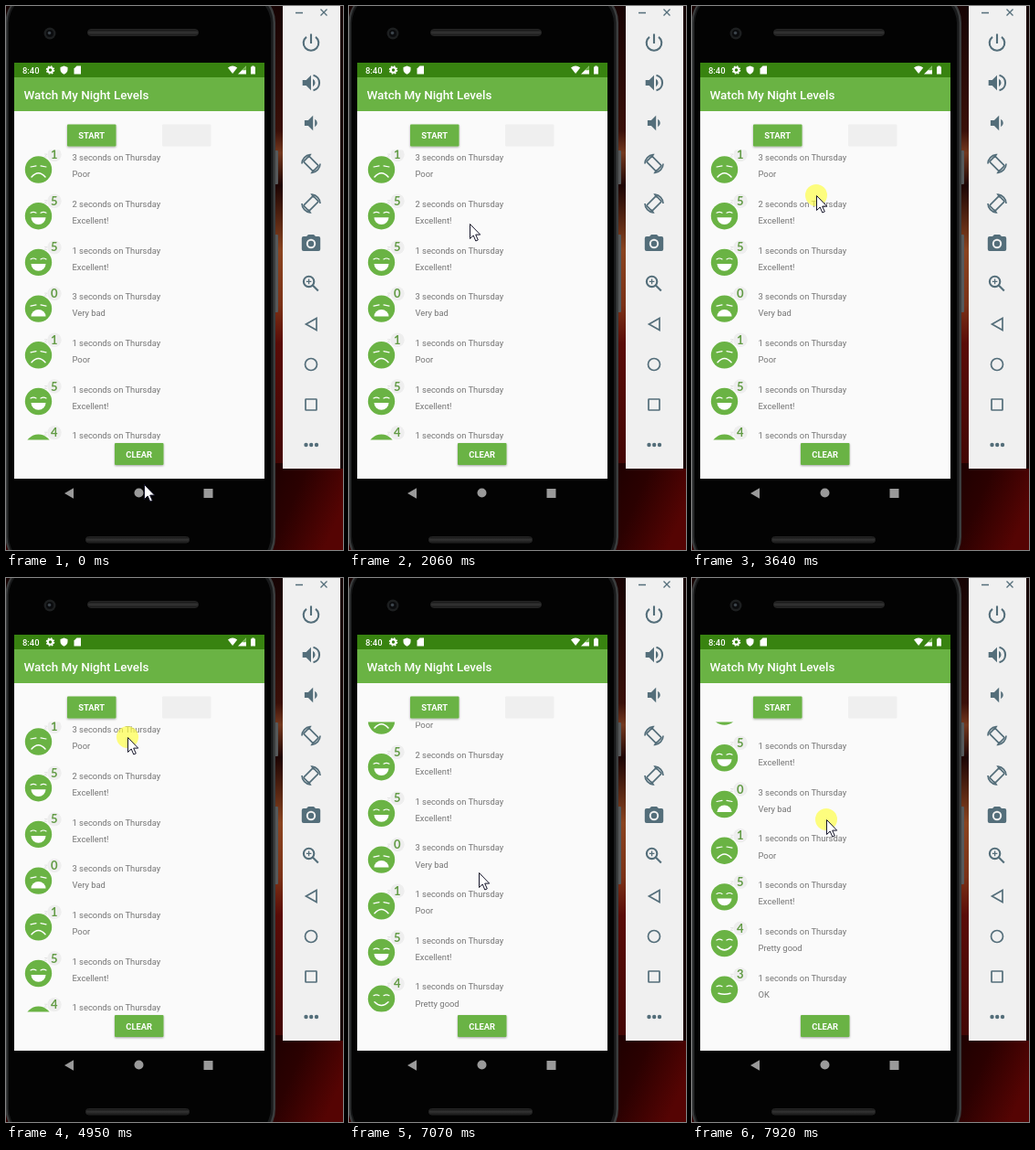
An HTML page for the animation above (8000 ms loop, 369 by 595 pixels).

```html
<!DOCTYPE html>
<html lang="en">
<head>
<meta charset="utf-8">
<title>Sleep list</title>
<style>
html, body { margin: 0; width: 100%; height: 100%; overflow: hidden; background: #000; }
svg { display: block; width: 100%; height: 100%; }
text { font-family: Roboto, "Noto Sans", sans-serif; font-size: 9.4px; }
.bold { font-weight: 500; fill: #fff; }
.title { font-size: 13.4px; }
.btn { font-weight: 700; fill: #fff; text-anchor: middle; }
.row { fill: #757575; }
.badge { font: 700 13px Lato, "Open Sans", sans-serif; fill: #629b45; text-anchor: middle; }
.line { fill: none; stroke: #fff; stroke-width: 1.5; stroke-linecap: round; }
.eyes { stroke-width: 1.2; }
.tool { fill: #546e7a; }
.open { fill: none; stroke: #546e7a; stroke-width: 1.7; }
.thin { stroke-width: 1.3; }
.thick { stroke-width: 2.1; }
</style>
</head>
<body>
<svg viewBox="0 0 369 595">
  <defs>
    <linearGradient id="wall" x2="0" y2="1">
      <stop offset="0" stop-color="#160303"/><stop offset=".23" stop-color="#3a1009"/>
      <stop offset=".27" stop-color="#74391f"/><stop offset=".33" stop-color="#1d0504"/>
      <stop offset=".45" stop-color="#8a4420"/><stop offset=".55" stop-color="#7b3217"/>
      <stop offset=".62" stop-color="#5a0c08"/><stop offset="1" stop-color="#330202"/>
    </linearGradient>
    <linearGradient id="floor" x2="1" y2=".5">
      <stop offset="0" stop-color="#1c0101"/><stop offset=".45" stop-color="#2b0101"/>
      <stop offset="1" stop-color="#550403"/>
    </linearGradient>
    <linearGradient id="bar" x2="0" y2="1">
      <stop offset="0" stop-color="#111"/><stop offset=".5" stop-color="#343434"/><stop offset="1" stop-color="#171717"/>
    </linearGradient>
    <filter id="shadow" x="-20%" y="-20%" width="140%" height="160%">
      <feDropShadow dx="0" dy="1" stdDeviation=".9" flood-opacity=".35"/>
    </filter>
    <clipPath id="view"><rect x="9" y="157.5" width="274" height="317"/></clipPath>
  </defs>

  <rect width="369" height="595" fill="url(#wall)"/>
  <rect x="285" y="500" width="84" height="95" fill="url(#floor)"/>
  <rect x="366" width="3" height="506" fill="#160202"/>

  <!-- phone -->
  <rect x="293" y="158" width="5" height="37" rx="1" fill="#55585a"/>
  <rect x="293" y="250" width="5" height="85" rx="1" fill="#55585a"/>
  <rect x="-.5" y="-17" width="295.5" height="633" rx="35" fill="#3b3d3e"/>
  <rect x="1.5" y="-15" width="291" height="629" rx="33" fill="#191a1b"/>
  <rect x="3" y="-13" width="287" height="625" rx="32" fill="#030303"/>
  <circle cx="48" cy="30" r="6.5" fill="#1d1f20"/>
  <circle cx="48" cy="30" r="4" fill="#0b0c0e"/>
  <circle cx="47.5" cy="29.5" r="1.8" fill="#3c444b"/>
  <rect x="89.5" y="25.5" width="121" height="7" rx="3.5" fill="url(#bar)" stroke="#242424"/>
  <rect x="87.5" y="580.5" width="113" height="6.5" rx="3" fill="url(#bar)" stroke="#242424"/>

  <!-- screen -->
  <rect x="9" y="62" width="274" height="455" fill="#fafafa"/>
  <rect x="9" y="78" width="274" height="37" fill="#6ab344"/>
  <rect x="9" y="62" width="274" height="16" fill="#388310"/>
  <text class="bold" x="18" y="73.5">8:40</text>
  <circle cx="48.5" cy="70" r="2.7" fill="none" stroke="#fff" stroke-width="2"/>
  <circle cx="48.5" cy="70" r="4.1" fill="none" stroke="#fff" stroke-width="1.3" stroke-dasharray="1.72 1.5"/>
  <g fill="#fff">
    <path d="M63.5 65.5l4 1.6v2.7q0 3.2-4 5-4-1.8-4-5v-2.7z"/>
    <path d="M77.5 65.5H82v9h-7.5v-6z"/>
    <path d="M243 67.5q5-3.8 10.2 0l-5.1 6.5z"/>
    <path d="M263 65.5v9h-9z"/>
    <path d="M268 66.5h1.3v-1h2.4v1h1.3v8h-5z"/>
  </g>
  <path fill="#6ab344" d="M262.9 65.7v4.5h-4.4z"/>
  <text class="bold title" x="19.5" y="101.5">Watch My Night Levels</text>
  <g fill="#6ab344" filter="url(#shadow)">
    <rect x="67" y="129.5" width="53.5" height="24" rx="1"/>
    <rect x="119" y="478" width="53.5" height="24" rx="1"/>
  </g>
  <rect x="171" y="129.5" width="53.5" height="24" rx="1" fill="#efefef"/>
  <text class="btn" x="93.7" y="145">START</text>
  <text class="btn" x="145.7" y="493.5">CLEAR</text>
  <g clip-path="url(#view)"><g id="list"></g></g>
  <g fill="#9a9a9a">
    <path d="M64 533l10-5.8v11.6z"/><circle cx="145.5" cy="532.5" r="5"/>
    <rect x="216.5" y="528" width="10" height="10"/>
  </g>

  <!-- side panel -->
  <rect x="303" width="63" height="506" fill="#f0f0f0"/>
  <g class="open">
    <path class="thin" d="M317 7.5h8M344.5 3.5l7 7m0-7l-7 7"/>
    <path class="thick" d="M334 30.5v10.5M329 33.8a8.3 8.3 0 1 0 10 0"/>
    <path class="thick" d="M336.5 75.8a8.4 8.4 0 0 1 0 16.4"/>
    <circle class="thick" cx="331.6" cy="301.4" r="5.7"/>
    <path class="thick" d="M335.8 305.6l6 6"/>
    <path class="thin" d="M328.8 301.4h5.6m-2.8-2.8v5.6"/>
    <path d="M328.5 348l11.5-6.5v13z"/><circle cx="334" cy="392" r="6.5"/>
    <rect x="328" y="430" width="12" height="12" rx=".5"/>
    <g id="turn" transform="translate(334 172.5)">
      <rect x="-4.3" y="-7.5" width="8.6" height="15" rx="1" transform="rotate(-45)"/>
      <path d="M-10 0A10 10 0 0 1-1-9.8l-2 3M10 0A10 10 0 0 1 1 9.8l2-3"/>
    </g>
    <use href="#turn" transform="translate(668 43.5) scale(-1 1)"/>
  </g>
  <g class="tool">
    <g id="horn"><path d="M324.7 81v6h4l5.3 5.2V75.8L328.700 81z"/><path d="M336 79.8a4.7 4.7 0 0 1 0 8.400z"/></g>
    <use href="#horn" x="2.2" y="44"/>
    <path d="M331 250l-2 2h-3.200q-2 0-2 2v12q0 2 2 2h16.400q2 0 2-2v-12q0-2-2-2H339l-2-2z"/>
    <circle cx="334" cy="260" r="4.2" stroke="#f0f0f0" stroke-width="2"/>
    <circle cx="328.5" cy="480" r="2.2"/><circle cx="334.2" cy="480" r="2.2"/><circle cx="340" cy="480" r="2.2"/>
  </g>

  <g id="mouse">
    <circle id="touch" r="12" fill="#ffff3c" fill-opacity=".65"/>
    <path d="M.5.5v16l3.7-3.5 2.6 6 2.5-1.1-2.6-5.8h5z" fill="#fff" stroke="#15152a"/>
  </g>
</svg>
<script>
const $ = id => document.getElementById(id);

const moods = {
  0: ['Very bad', '<path fill="#fff" d="M-8 8.5a8 7.5 0 0 1 16 0z"/>'],
  1: ['Poor', '<path class="line" d="M-7.5 8Q0-.5 7.5 8"/>'],
  3: ['OK', '<path class="line" d="M-6.5 4Q0 6 6.5 4"/>'],
  4: ['Pretty good', '<path class="line" d="M-7.5 3.5Q0 11 7.5 3.5"/>'],
  5: ['Excellent!', '<path fill="#fff" d="M-8 1.5H8a8 7.8 0 0 1-16 0z"/>']
};
const nights = [[3, 1], [2, 5], [1, 5], [3, 0], [1, 1], [1, 5], [1, 4], [1, 3]];

$('list').innerHTML = nights.map(([secs, mood], i) => {
  const [label, mouth] = moods[mood];
  const eyes = mood > 2 ? 'M-8.5-3.5q3-1.8 6 0m5 0q3-1.8 6 0' : 'M-8.5-3l6-1.2m5 0l6 1.2';
  return `<g transform="translate(0 ${166 + i * 50.7})">
    <circle cx="53" cy="-3.5" r="7.7" fill="#eee"/>
    <path d="M37 .5h2.5L37 3h2.5M42-4h3l-3 3h3" fill="none" stroke="#e6e6e6"/>
    <text class="badge" x="52.7" y="1">${mood}</text>
    <g transform="translate(35.5 13)"><circle r="14.7" fill="#6ab344"/>
      <path class="line eyes" d="${eyes}"/>${mouth}</g>
    <text class="row" x="72.5" y="3.2">${secs} seconds on Thursday</text>
    <text class="row" x="72.5" y="21.4">${label}</text></g>`;
}).join('');

// start, end, then the x and y reached
const moves = [
  [70, 170, 146, 508],
  [390, 950, 116, 225],
  [1170, 1400, 118, 207],
  [1480, 1740, 124, 212],
  [1890, 2060, 132, 238],
  [2140, 2430, 129, 255],
  [2920, 3240, 137, 216],
  [3490, 3640, 136, 207],
  [3810, 4550, 133, 180],
  [4630, 4730, 133, 175],
  [4950, 4950, 133, 174],
  [5720, 5800, 128, 205],
  [5880, 5960, 132, 242],
  [6130, 6280, 141, 259],
  [6380, 6380, 141, 262],
  [6450, 6570, 143, 246],
  [6900, 6900, 143, 240],
  [6980, 7070, 142, 322],
  [7290, 7380, 143, 317],
  [7520, 7920, 147, 264]
];
const presses = [[2750, 5500], [6380, 6980], [7290, 8000]];
const pressed = t => presses.some(([a, b]) => t >= a && t < b);

function pose(t) {
  let x = 151, y = 523, scroll = 0;
  for (const [from, to, endX, endY] of moves) {
    if (t < from) break;
    const steps = Math.round((to - from) / 75) + 1;
    const gap = (to - from) / (steps - 1) || 1;
    const f = Math.min(steps, Math.floor((t - from) / gap + 1.001)) / steps;
    const dy = (endY - y) * f;
    x += (endX - x) * f;
    y += dy;
    // the list follows the finger in the late drags
    if (from > 6400 && pressed(from)) scroll -= dy * 1.045;
  }
  return [Math.round(x), Math.round(y), scroll];
}

function draw(now) {
  const t = now % 8000, [x, y, scroll] = pose(t);
  $('list').setAttribute('transform', `translate(0 ${-scroll})`);
  $('mouse').setAttribute('transform', `translate(${x} ${y})`);
  $('touch').setAttribute('visibility', pressed(t) ? 'visible' : 'hidden');
  requestAnimationFrame(draw);
}
draw(0);
</script>
</body>
</html>
```
